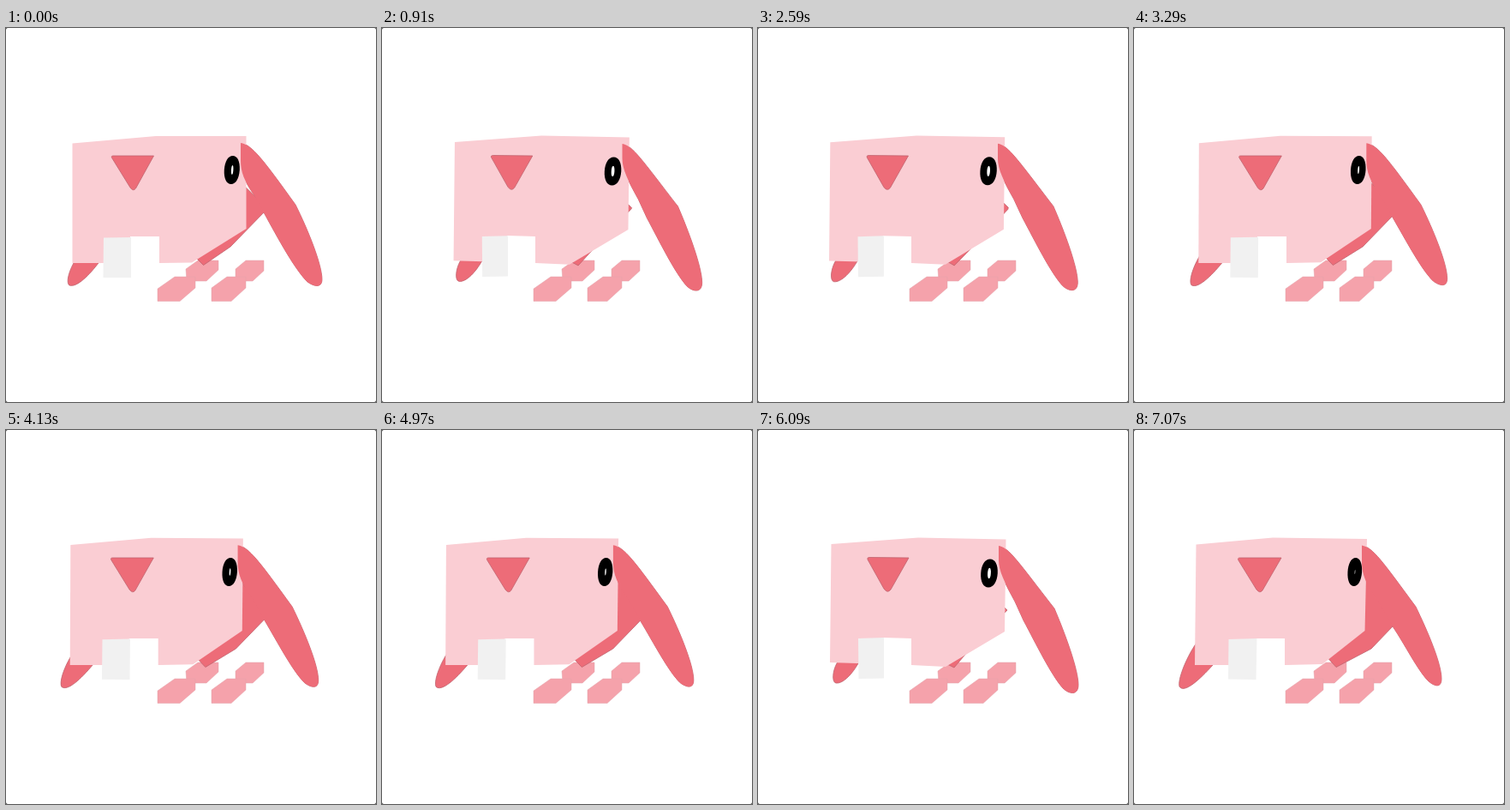
Animation, 432 px wide and 436 px high, one loop 7280 ms. Source, as an HTML page:

```html
<!DOCTYPE html>
<html lang="en">
<head>
<meta charset="utf-8">
<title>Paper animal</title>
<style>
  html, body { margin: 0; width: 100%; height: 100%; overflow: hidden; background: #222; }
  svg { display: block; width: 100%; height: 100%; background: #fff; border-radius: 2px; }
  .skin { fill: #facdd3; }
  .dark { fill: #ed6c78; }
  .line { stroke: #c0646f; stroke-width: .8; }
  .foot { fill: #f5a2ab; stroke: #e3a0a8; stroke-width: .5; }
</style>
</head>
<body>
<svg viewBox="0 0 432 436" preserveAspectRatio="none">
  <g class="foot">
    <path d="M210 281L224 271H248V282L234 295H211Z"/>
    <path d="M177 304L197 290H221V303L203 318.5H177Z"/>
    <path d="M268 281L280 271H301V283L288 295H268Z"/>
    <path d="M240 303L258 290H280V303L263 318.5H240Z"/>
  </g>
  <path id="tail" class="dark line"/>
  <use href="#trunk" class="line"/>
  <path id="band" class="dark line"/>
  <path id="body" class="skin"/>
  <path id="gap" fill="#fff"/>
  <path id="leg" fill="#f1f1f1"/>
  <path id="ear" class="dark line"/>
  <path id="trunk" class="dark"/>
  <path id="eye" fill="#000"/>
  <path id="pupil" fill="#fff"/>
</svg>
<script>
// Each part has three poses: stretched, middle, crouched.
const poses = {
  tail: [
    'M98 262L92 272C87 281 86 294 91 295C100 296 111 283 117 272Z',
    'M88 258L79 274C73 285 70 297 74 300C83 303 98 287 108 274Z',
    'M76 244L71 251C60 268 51 291 53 299C58 307 74 294 92 274Z'
  ],
  band: [
    'M270 190L291 210L290 211L240 264L229 277L221 273Z',
    'M275 181L300 205L302 214L262 255L230.5 276.5L223 269Z',
    'M262 160L300 205L302 229L277 255L236 276.5L226 265.5Z'
  ],
  body: [
    'M85.5 133L187 125.5L289.5 127.5L288 235L219 276L179 274L84 271Z',
    'M77.5 134.5L175 126L280.5 126L280.5 234L217 273.5L179 274L77.5 274Z',
    'M72.5 133.5L162 125.5L272 127L269.5 234L220 273L177 274L71 274Z'
  ],
  gap: [
    'M146 242L179 243L179 279L146 279Z',
    'M145 243L179 243L179 279L145 279Z',
    'M142 243L176 243L176 279L142 279Z'
  ],
  leg: [
    'M117 243L147 242L147 289.5L117.5 290Z',
    'M114 244.5L146 244L146 291L113.5 291Z',
    'M110.5 244L143.5 243L142.5 291L110 290.5Z'
  ],
  ear: [
    'M128 151Q127 148.5 130 148.5L176 149L155 186Q151 191 147 185Z',
    'M124 152Q122 149 125 149L172.5 149L151.5 187Q148.5 191 145 186Z',
    'M122 152Q120.5 149 123.5 149L172 149L150 187Q147 191 143 186Z'
  ],
  trunk: [
    'M281 135C293 137 304 154 346 208C358 236 374 279 374 297C374 310 363 308 356 301C342 285 325 250 310 222L300 200C288 178 281 164 281 152Z',
    'M274 134C287 136 300 153 338 206C353 236 369 276 369 293C369 304 359 301 352 296C337 281 318 246 301 215L290 195C278 178 274 168 274 154Z',
    'M266 134.5C279 137 290 153 329 206C343 235 359 272 359 290C359 301 351 299 344 293C331 280 317 251 302 229L285 200C271 180 266 168 266 154Z'
  ]
};

const oval = (x, y, rx, ry, lean) => {
  const k = .6, u = rx * k, v = ry * k;
  const p = (dx, dy) => (x + dx - dy * lean) + ' ' + (y + dy);
  return `M${p(0, -ry)}C${p(u, -ry)} ${p(rx, -v)} ${p(rx, 0)}C${p(rx, v)} ${p(u, ry)} ${p(0, ry)}` +
    `C${p(-u, ry)} ${p(-rx, v)} ${p(-rx, 0)}C${p(-rx, -v)} ${p(-u, -ry)} ${p(0, -ry)}Z`;
};
poses.eye = [
  oval(270, 167, 9.8, 16.5, .06),
  oval(263.8, 165.6, 9, 16.5, .06),
  oval(257.8, 165.6, 8.3, 16.5, .06)
];
poses.pupil = [
  oval(270, 167, 1.9, 6.2, .06),
  oval(264.2, 165.5, 1.2, 5.5, .06),
  oval(258, 165.5, .3, 2.5, .06)
];

const LOOP = 7280, STEP = 70, PERIOD = 852, FIRST = 122, MIDDLE = .45;
const HALF = PERIOD / 2, END = FIRST + 7.5 * PERIOD, POWER = 2.3;
const number = /-?\d+(\.\d+)?(e-?\d+)?/g;

const parts = Object.entries(poses).map(([id, shapes]) => ({
  node: document.getElementById(id),
  shape: shapes[0],
  keys: shapes.map(d => d.match(number).map(Number))
}));

const ease = p => p < .5
  ? Math.pow(2 * p, POWER) / 2
  : 1 - Math.pow(2 - 2 * p, POWER) / 2;

// 0 is fully stretched, 1 is fully crouched
function crouch(t) {
  if (t >= END) return 1;
  if (t < FIRST) return ease(.478 * (1 - t / FIRST));
  const m = (t - FIRST) % PERIOD;
  return ease(1 - Math.abs(1 - m / HALF));
}

function draw(t) {
  const c = crouch(t);
  const i = c < MIDDLE ? 0 : 1;
  const f = i ? (c - MIDDLE) / (1 - MIDDLE) : c / MIDDLE;
  for (const { node, shape, keys } of parts) {
    let n = 0;
    node.setAttribute('d', shape.replace(number, () => {
      const a = keys[i][n], b = keys[i + 1][n++];
      return (a + (b - a) * f).toFixed(2);
    }));
  }
}

const start = performance.now();
function tick() {
  const t = (performance.now() - start) % LOOP;
  draw(Math.floor(t / STEP) * STEP);
  requestAnimationFrame(tick);
}
tick();
</script>
</body>
</html>
```
